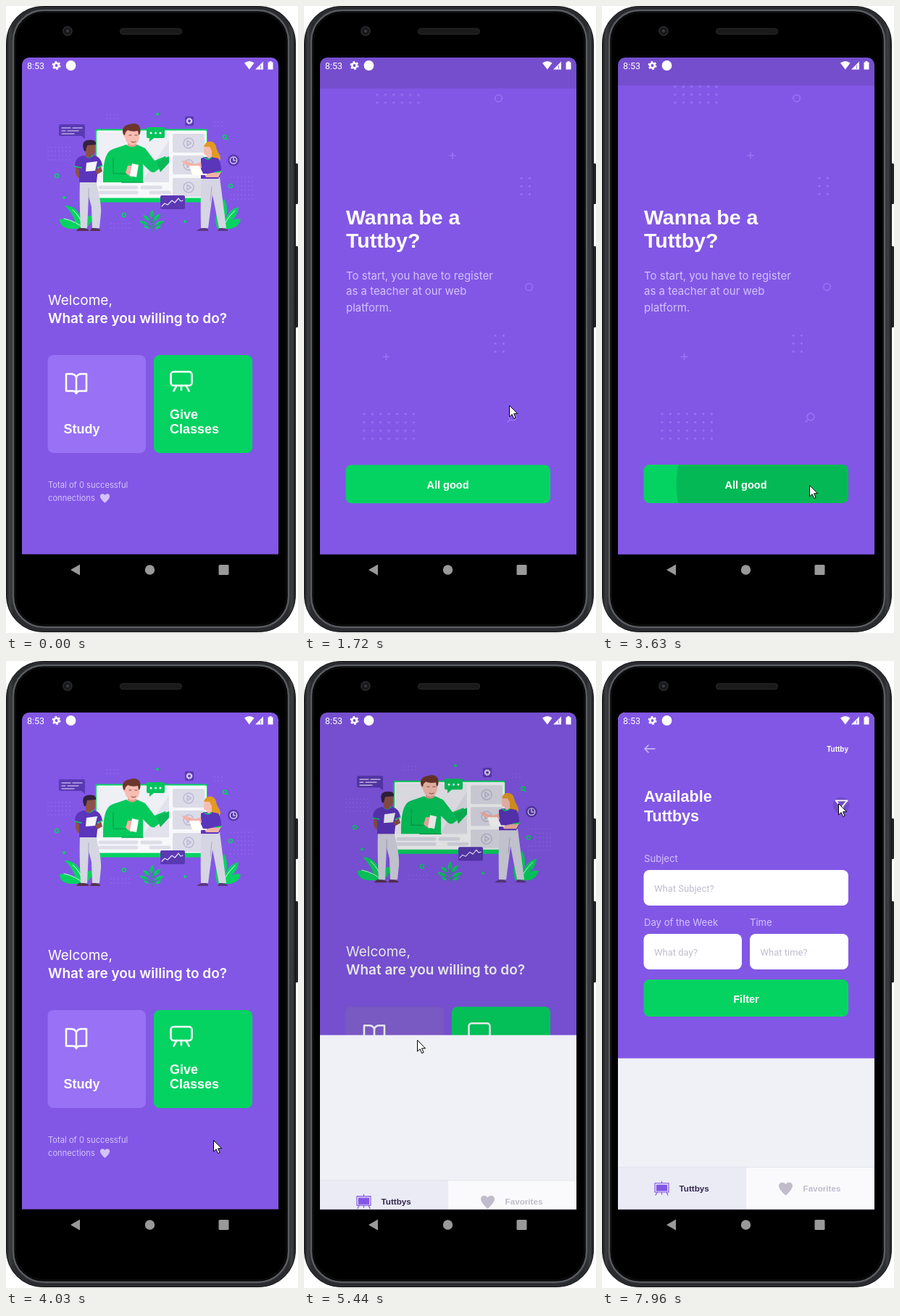
These frames come from a looping animation (403x864 px, 8000 ms). An HTML page:

```html
<!DOCTYPE html>
<html lang="en">
<head>
<meta charset="utf-8">
<title>Tutoring app walkthrough</title>
<style>
  html, body { margin: 0; width: 100%; height: 100%; overflow: hidden; background: #fff; }
  svg { display: block; }
  .bold { font-family: "Liberation Sans", Arial, sans-serif; font-weight: 700; fill: #fff; }
  .soft { font-family: Inter, sans-serif; fill: #d4c2ff; }
  .field { font: 13px Roboto, sans-serif; fill: #c1bccc; }
  .line { fill: none; stroke-linecap: round; stroke-linejoin: round; }
  .dots { fill: none; stroke: #9871f5; stroke-linecap: round; }
</style>
</head>
<body>
<svg width="403" height="864" viewBox="0 0 403 864">
  <defs>
    <clipPath id="screen"><path d="M22 755.500V81a10 10 0 0 1 10-10H366a10 10 0 0 1 10 10V755.500z"/></clipPath>
    <clipPath id="card"><path d="M22 71H376V756H22z"/></clipPath>
    <clipPath id="studyClip"><rect x="57.500" y="481" width="135.500" height="135" rx="8"/></clipPath>
    <clipPath id="giveClip"><rect x="204" y="481" width="136" height="135" rx="8"/></clipPath>
    <clipPath id="goodClip"><rect x="57.500" y="632" width="282.500" height="53" rx="8"/></clipPath>
    <path id="heart" d="M0 8.500C-4 5.500-9-.500-9-4C-9-9-2.500-10 0-6C2.500-10 9-9 9-4C9-.500 4 5.500 0 8.500z"/>
    <g id="thumb">
      <rect width="44" height="26" rx="2" fill="#dcdce8"/>
      <g class="line" stroke="#bcb8d2" stroke-width="1.500"><circle cx="22" cy="13" r="7"/><path d="M20 9.500v7l5.500-3.500z"/></g>
    </g>
    <linearGradient id="rim">
      <stop offset="0" stop-color="#1c1d1f"/><stop offset=".012" stop-color="#3c3e41"/><stop offset=".025" stop-color="#2a2b2e"/>
      <stop offset=".975" stop-color="#2a2b2e"/><stop offset=".988" stop-color="#3c3e41"/><stop offset="1" stop-color="#1c1d1f"/>
    </linearGradient>
  </defs>

  <!-- Phone -->
  <path d="M398 217h4q1 0 1 2v52q0 2-1 2h-4zM398 331h4q1 0 1 2v108q0 2-1 2h-4z" fill="#222326"/>
  <rect x=".500" y=".500" width="399" height="862" rx="50" fill="url(#rim)" stroke="#141416"/>
  <rect x="10" y="6" width="380" height="850" rx="42" fill="#000" stroke="#5a5c61" stroke-width="2.500"/>
  <rect x="13" y="9" width="374" height="844" rx="39" fill="#000" stroke="#0c0c0d" stroke-width="2"/>
  <circle cx="85" cy="34.500" r="6" fill="#17181a" stroke="#2d2e31" stroke-width="1.500"/>
  <circle cx="85" cy="34.500" r="2" fill="#3b3d42"/>
  <rect x="157.500" y="31" width="85" height="8" rx="4" fill="#1a1a1b" stroke="#2b2b2d"/>
  <g fill="#999">
    <path d="M89 777l13-7.500v15z"/><circle cx="198.500" cy="777" r="6.700"/>
    <rect x="293.500" y="770" width="14" height="14" rx="1.500"/>
  </g>

  <g clip-path="url(#screen)">
    <!-- Home -->
    <g id="home">
      <path d="M22 71H376V770H22z" fill="#8257e5"/>
      <g class="dots" stroke-width="1.500" stroke-dasharray="0 5">
        <path d="M139 150h16M139 155h16M58 195h31M58 200h31M58 206h31M58 212h31M288 160h13M288 165h13"/>
        <path d="M310 236h31M320 242h21M320 248h21M320 254h21M310 260h31M310 266h31M145 300h26M145 306h26"/>
      </g>
      <rect x="123" y="169.500" width="155" height="101" rx="3" fill="#04d361"/>
      <rect x="125" y="171.500" width="152" height="93" rx="2" fill="#f8f8fc"/>
      <path d="M127 174H225V243H127z" fill="#efeff6"/>
      <path d="M187 243l38-58v58z" fill="#e2e2ec"/>
      <use href="#thumb" x="230" y="176"/><use href="#thumb" x="230" y="206"/><use href="#thumb" x="230" y="237"/>
      <path class="line" d="M130 250h50M188 250h25M130 257h50M200 257h25" stroke="#dedee9" stroke-width="5"/>
      <!-- Presenter -->
      <path d="M134 243c0-25 2-42 14-46l18-6q8 6 15 0l11 5 13 17 15-6 4 8-19 14q-5 1-9-4l-7-7v25z" fill="#06c95c"/>
      <path d="M168 185h12v7q-6 5-12 0z" fill="#e79a8e"/>
      <path d="M208 215l17-8 0 9-12 13z" fill="#0bb858"/>
      <path d="M148 209v22h22M160 243h29" class="line" stroke="#04a94d" stroke-width="1.500"/>
      <path d="M164 171h20l0 11q-2 9-9 10-9-1-11-11-3-2-2-6z" fill="#f6bdb2"/>
      <path d="M162 177c-3-8 1-13 9-14 9-3 17 1 14 13l-2 2-1-6q-8 2-14-1l-3 3-1 4z" fill="#6d352c"/>
      <path class="line" d="M170 178h3M178 178h3M173 187q3 2 6 0" stroke="#8a4a40"/>
      <path d="M168 220l9 0 1 8-5 8-8-6z" fill="#f4b2a7"/>
      <path d="M174 217l9 2-3 17-9-2z" fill="#fff"/>
      <path d="M194 169q0-2 2-2h21q2 0 2 2v11q0 2-2 2h-13l-6 5v-5h-2q-2 0-2-2z" fill="#04c45b"/>
      <path class="line" d="M200 175h14" stroke="#fff" stroke-width="3" stroke-dasharray="0 6.500"/>
      <!-- Plants -->
      <g fill="#04d361">
        <path d="M74 294q12-3 22 5-4-14-15-24 19 0 24 22 6-10 17-8-3 8-12 18H88q-14-2-14-13z"/>
        <path d="M292 307c-6-16-1-28 9-41q7 13 2 26 7-13 18-15-1 13-11 19 7-4 14-2-3 11-14 13z"/>
        <path d="M200 292q-3-5 2-11 4 6 0 11zM198 296q-7 0-9-8 8 1 9 8zM204 296q0-8 9-10-1 9-9 10zM197 302q-8 1-13-6 9-1 13 6zM205 302q4-7 13-6-4 8-13 6zM197 307q-5 0-7-4 6-1 7 4zM206 307q2-5 8-4-2 5-8 4z"/>
      </g>
      <path class="line" d="M80 293q18 4 26 13M92 281q12 10 14 24M299 276q1 18-2 29M316 282q-12 11-17 24" stroke="#d8f8e5"/>
      <path class="line" d="M201.500 285v25M190 291l11.500 8 11-11M188 298l13.500 7 14-7" stroke="#07aa50"/>
      <!-- Left student -->
      <path d="M104 305l10 3v2H97q2-4 7-5zM119 305l11 3v2h-14z" fill="#57324d"/>
      <path d="M102 241h22c4 15 8 34 7 45l-2 20h-10l-1-29-4-15-2 44h-9q-2-36-1-65z" fill="#d6d5e3"/>
      <path d="M114 251v14" class="line" stroke="#aaa8c0"/>
      <path d="M96 219l7 2 2 8 10-4 2 6-13 7q-6 0-8-8z" fill="#8c5149"/>
      <path d="M95 221q0-13 12-15h15q9 2 11 13l-6 4-2 20h-24v-18z" fill="#5b35bb"/>
      <path d="M95 221l9 2M126 223l7-3M110 206q5 5 10 0" class="line" stroke="#04d361" stroke-width="1.500"/>
      <path d="M109 190h14v10q-1 6-5 6v2q-4 2-8-1z" fill="#8c5149"/>
      <path d="M108 200q-5-13 4-15 13-2 12 6l-12 1-2 8z" fill="#33203f"/>
      <path d="M111 216l15-2-3 13-13 1z" fill="#f5f5fb"/>
      <path d="M131 221l2 7-7 4-3-5z" fill="#8c5149"/>
      <!-- Right student -->
      <path d="M274 305l5 3v2h-16q4-4 11-5zM295 305l11 3v2h-14z" fill="#5b387f"/>
      <path d="M270 236h25l9 70h-10l-9-46-6 46h-10q-1-44 1-70z" fill="#d6d5e3"/>
      <path d="M284 249l-2 20" class="line" stroke="#aaa8c0"/>
      <path d="M274 194c1-9 14-10 16 0 1 8 9 13 5 19-4 3-9 1-12-2z" fill="#e29a22"/>
      <path d="M269 210q5-3 14-2l10 2q5 8 4 20l-4 8h-24z" fill="#5b35bb"/>
      <path d="M274 192h8l2 7v9q-4 4-7 0v-2q-5 0-4-6z" fill="#f6bdb2"/>
      <path d="M273 194q2-8 9-7 8 2 7 11l3 11q-8-2-8-9l-3-6z" fill="#e29a22"/>
      <path d="M269 215l-9 3-10-4-8-1 6 6 12 5 10-1zM298 227l-5 9-17 0-2-4 15-3z" fill="#f4b2a7"/>
      <path d="M253 220l14 0 5 11-15 1zM258 231h19v2h-18z" fill="#fff"/>
      <path class="line" d="M274 209q5 4 9 0M289 229l9-1" stroke="#04d361" stroke-width="1.500"/>
      <!-- Badges -->
      <g fill="#5a39b3">
        <path d="M75 163h32q2 0 2 2v18l-5-4H75q-2 0-2-2v-12q0-2 2-2z"/>
        <rect x="247" y="152" width="12" height="13" rx="2"/><circle cx="314" cy="212.500" r="8"/>
        <rect x="213" y="261" width="34" height="19" rx="2"/>
      </g>
      <g class="line" stroke="#e9e1ff" stroke-width="1.200">
        <path d="M77 168h12M92 168h13M77 172h5M85 172h15M77 176h17"/>
        <circle cx="253" cy="158.500" r="2.500"/><circle cx="253" cy="158.500" r="3.700" stroke-dasharray="1.500 1.400"/>
        <circle cx="314" cy="212.500" r="4.700"/><path d="M314 209v4h3"/>
        <path d="M215 276l4-4 4 2 6-6 4 3 5-6 3 4 3-1"/>
      </g>
      <g class="line" stroke="#04d361" stroke-width="1.500">
        <circle cx="302" cy="180.500" r="2.500"/><path d="M304 182.500l2 2"/>
        <circle cx="70" cy="234" r="2.500"/><circle cx="310" cy="248" r="2.500"/><circle cx="163" cy="288" r="2.500"/>
      </g>
      <path class="line" d="M209 149h.1M80 264h.1M247 297h.1" stroke="#04d361" stroke-width="4"/>

      <g font-size="19">
        <text class="soft" x="58" y="412" style="fill:#fff">Welcome,</text>
        <text class="soft" x="58" y="437" style="fill:#fff" font-weight="600">What are you willing to do?</text>
      </g>
      <g clip-path="url(#studyClip)"><path d="M57 481h136v135H57z" fill="#9871f5"/><circle id="studyRipple"/></g>
      <g clip-path="url(#giveClip)"><path d="M204 481h136v135H204z" fill="#04d361"/><circle id="giveRipple"/></g>
      <g class="line" stroke="#fff" stroke-width="2.600">
        <path d="M97 511.500q-2-4.500-7-4.500h-7v23.500h9q4 0 5 3.500 1-3.500 5-3.500h9V507h-7q-5 0-7 4.500zV534"/>
        <rect x="227.500" y="504" width="29" height="19" rx="4"/><path d="M235.500 523l-4 7.500M248.500 523l4 7.500M242 523v6"/>
      </g>
      <g class="bold" font-size="18">
        <text x="79.500" y="589">Study</text><text x="226" y="569">Give</text><text x="226" y="589">Classes</text>
      </g>
      <g class="soft" font-size="11.200"><text x="58" y="664">Total of 0 successful</text><text x="58" y="682">connections</text></g>
      <use href="#heart" transform="translate(136.500 678.500) scale(.74)" fill="#d4c2ff"/>
      <path id="homeShade" d="M22 71H376V770H22z"/>
    </g>

    <!-- Give classes -->
    <g id="give" clip-path="url(#card)"><g>
      <path d="M22 50H376V770H22z" fill="#8257e5"/>
      <g transform="translate(0 -1.500)">
        <g class="dots" stroke-width="3.200" stroke-dasharray="0 11.400">
          <path d="M101 111h58M101 122h58M101 133h58M300 237h12M300 248h12M300 259h12M264 454h12M264 465h12M264 476h12"/>
          <path d="M83 562h70M83 573.500h70M83 585h70M83 596h70"/>
        </g>
        <g class="line" stroke="#9871f5" stroke-width="1.700">
          <circle cx="268.500" cy="127" r="4.800"/><circle cx="310.500" cy="387" r="4.800"/>
          <circle cx="288" cy="566" r="5"/><path d="M284.500 570l-3.500 3M201 206h8M205 202v8M109.500 483h8M113.500 479v8"/>
        </g>
        <g class="bold" font-size="28.500"><text x="58" y="301">Wanna be a</text><text x="58" y="332.500">Tuttby?</text></g>
        <g class="soft" font-size="15">
          <text x="58" y="377">To start, you have to register</text><text x="58" y="397.500">as a teacher at our web</text>
          <text x="58" y="420.500">platform.</text>
        </g>
        <g clip-path="url(#goodClip)"><path d="M57 632h284v54H57z" fill="#04d361"/><circle id="goodRipple"/></g>
        <text class="bold" font-size="14.500" x="198.500" y="665" text-anchor="middle">All good</text>
      </g>
    </g></g>

    <!-- Study -->
    <g id="study" clip-path="url(#card)"><g>
      <path d="M22 50H376V770H22z" fill="#f0f0f7"/>
      <path id="header" fill="#8257e5"/>
      <path class="line" d="M73 121H59M64 116l-5 5 5 5" stroke="#d4c2ff" stroke-width="1.400"/>
      <text class="bold" font-size="10" x="340" y="124.500" text-anchor="end">Tuttby</text>
      <g class="bold" font-size="21.500"><text x="58" y="194">Available</text><text x="58" y="220.500">Tuttbys</text></g>
      <circle id="filterRipple"/>
      <path class="line" transform="translate(321 190) scale(.8)" d="M22 3H2l8 9.460V19l4 2v-8.540z" stroke="#fff" stroke-width="2.300"/>
      <g id="form">
        <g class="soft" font-size="13.100">
          <text x="58" y="277">Subject</text><text x="58" y="365">Day of the Week</text><text x="204" y="365">Time</text>
        </g>
        <g fill="#fff">
          <rect x="57.500" y="288" width="282.500" height="49" rx="8"/>
          <rect x="57.500" y="376" width="135.500" height="49" rx="8"/><rect x="204" y="376" width="136" height="49" rx="8"/>
        </g>
        <g class="field"><text x="72" y="318">What Subject?</text><text x="72" y="406">What day?</text><text x="218.500" y="406">What time?</text></g>
        <rect x="57.500" y="439" width="282.500" height="51" rx="8" fill="#04d361"/>
        <text class="bold" font-size="14.500" x="199" y="470.500" text-anchor="middle">Filter</text>
      </g>
      <path d="M22 697H199V756H22z" fill="#ebebf5"/><path d="M199 697H376V756H199z" fill="#fafafc"/>
      <path d="M22 697.500H376" stroke="#e3e3ee"/>
      <g class="line" stroke="#8257e5" stroke-width="1.200">
        <path d="M73 719.500h19v12.500h-19zM76 732l-2 4M89 732l2 4M82.500 717v2M82.500 732v3"/><path d="M75.500 722h14v8h-14z" fill="#8257e5"/>
      </g>
      <use href="#heart" transform="translate(253.500 727.500) scale(1.050)" fill="#c1bccc"/>
      <g class="bold" font-size="11.700">
        <text x="106.500" y="731" style="fill:#32264d">Tuttbys</text><text x="277.500" y="731" style="fill:#c1bccc">Favorites</text>
      </g>
    </g></g>

    <!-- Status bar -->
    <text x="29" y="86.500" font-family="Roboto, sans-serif" font-size="12.500" fill="#fff">8:53</text>
    <g fill="none" stroke="#fff"><circle cx="69.500" cy="82" r="3.200" stroke-width="2.600"/><circle cx="69.500" cy="82" r="5" stroke-width="2" stroke-dasharray="2.600 2.636"/></g>
    <g fill="#fff">
      <circle cx="89.500" cy="82" r="6.900"/>
      <path d="M329 78.500q7-5 13.500 0L335.800 87.500zM344 87.500l11-11v11z"/>
      <path d="M361.500 77.500h2v-1.500h3v1.500h2v10h-7z"/>
    </g>
    <path d="M351.500 81.500v5" stroke="#8257e5" stroke-width=".8"/>
  </g>

  <path id="cursor" d="M.5.500v15.500l3.600-3.300 2.500 5.800 2.500-1.100-2.500-5.600h5z" fill="#fff" stroke="#000"/>
  <circle id="click" r="12" fill="#ff0" fill-opacity=".47"/>
</svg>

<script>
const $ = id => document.getElementById(id);
const LOOP = 8000, HEIGHT = 685;

// Screen updates: first time, last time, number of steps.
const updates = [
  [0], [370, 850, 7], [1240, 1960, 10], [2430, 2820, 6], [2980], [3400], [3550, 4030, 7], [4260, 4740, 7],
  [5130, 5910, 11], [5990, 6550, 8], [6700], [7020, 7100, 2], [7330], [7570], [7730], [7880, 7960, 2]
];
// Pointer path: time, x, y.
const path = [
  [370, 334, 807], [850, 283, 550], [2350, 283, 550], [2590, 292, 606], [2820, 287, 660], [2980, 286, 660],
  [4180, 286, 660], [4740, 159, 565], [5290, 159, 565], [5910, 141, 279], [6550, 332, 190],
  [6940, 332, 190], [7100, 326, 192], [7330, 326, 194], [7570, 326, 196], [LOOP, 326, 196]
];
const clicks = [1240, 3400, 5130, 6550, 7730];

const clamp = v => Math.min(1, Math.max(0, v));

function bezier(x1, y1, x2, y2) {
  const at = (a, b, s) => 3 * a * s * (1 - s) ** 2 + 3 * b * s * s * (1 - s) + s ** 3;
  return x => {
    if (x <= 0 || x >= 1) return clamp(x);
    let low = 0, high = 1;
    for (let i = 0; i < 24; i++) {
      const mid = (low + high) / 2;
      if (at(x1, x2, mid) < x) low = mid; else high = mid;
    }
    return at(y1, y2, low);
  };
}
const reveal = bezier(.35, .45, 0, 1), standard = bezier(.4, 0, .2, 1);

// Steps are not perfectly even, so a step may start slightly early.
function snap(t) {
  const [first, last = first, steps = 1] = updates.findLast(u => u[0] <= t);
  if (t >= last) return last;
  const step = (last - first) / (steps - 1);
  return first + Math.floor((t - first) / step + .1) * step;
}

function pointer(t) {
  const i = Math.max(1, path.findIndex(k => k[0] >= t));
  const [t0, x0, y0] = path[i - 1], [t1, x1, y1] = path[i];
  const u = clamp((t - t0) / (t1 - t0)), s = u * u * (3 - 2 * u);
  return [Math.round(x0 + (x1 - x0) * s), Math.round(y0 + (y1 - y0) * s)];
}

const shift = (el, x, y) => el.setAttribute("transform", `translate(${x} ${y})`);

function showCard(card, p) {
  const rest = HEIGHT * (1 - p);
  shift(card, 0, rest);
  shift(card.firstElementChild, 0, -.959 * rest);
}

// Grows from the pressed point towards the middle of the button.
function ripple(el, age, [x, y], [cx, cy], r0, r1) {
  const f = standard(clamp(age / 225));
  el.setAttribute("cx", x + (cx - x) * f);
  el.setAttribute("cy", y + (cy - y) * f);
  el.setAttribute("r", r0 + (r1 - r0) * f);
  el.setAttribute("opacity", .12 * clamp(age / 75) * clamp((375 - age) / 150));
}

function draw(now) {
  const t = snap(now % LOOP);
  const progress = start => reveal((t - start) / 425);
  const give = progress(1490) - progress(3613), study = progress(5372), covered = give + study;

  showCard($("give"), give);
  showCard($("study"), study);
  shift($("home"), 0, -.02 * HEIGHT * covered);
  $("homeShade").setAttribute("opacity", .1 * clamp(covered / .36));

  ripple($("giveRipple"), t - 1373, [283, 550], [272, 548], 41, 96);
  ripple($("goodRipple"), t - 3533, [286, 660], [198.5, 659], 85, 144);
  ripple($("studyRipple"), t - 5263, [159, 565], [125.5, 548], 41, 96);
  ripple($("filterRipple"), t - 7863, [330, 199], [330, 199], 6, 14);

  const open = t >= 7960;
  $("form").style.display = open ? "" : "none";
  $("header").setAttribute("d", `M22 50H376V${open ? 547.5 : 299}H22z`);

  const [x, y] = pointer(t);
  shift($("cursor"), x, y);
  shift($("click"), x, y);
  $("cursor").style.display = t < 370 ? "none" : "";
  $("click").style.display = clicks.some(c => t >= c && t < c + 150) ? "" : "none";
  requestAnimationFrame(draw);
}
draw(0);
</script>
</body>
</html>
```
